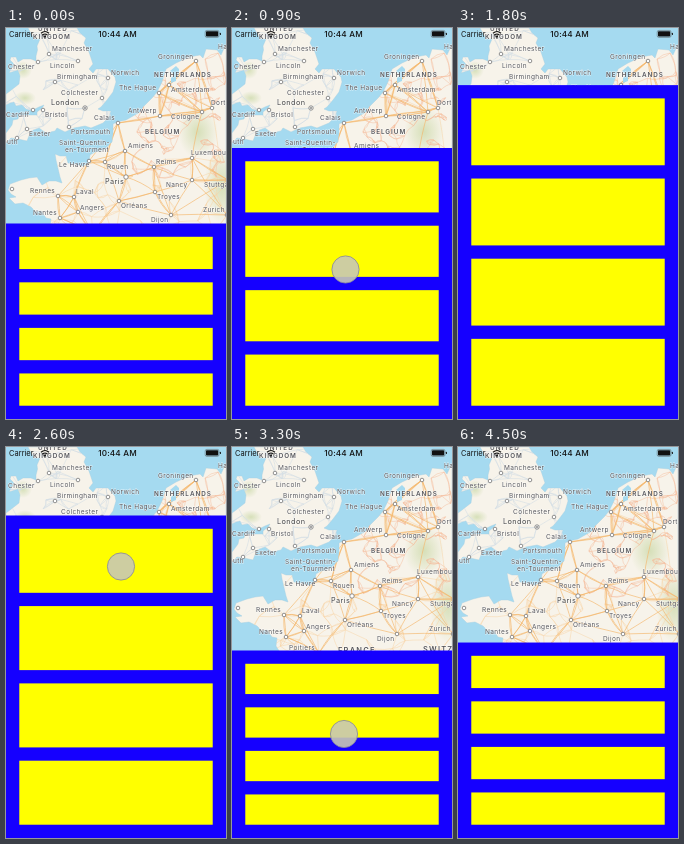
Animation of 220x391 px, one loop 4600 ms. Source, as an HTML page:

```html
<!DOCTYPE html>
<html lang="en">
<head>
<meta charset="utf-8">
<title>Map with stretching panel</title>
<style>
  html, body { margin: 0; width: 100%; height: 100%; overflow: hidden; }
  svg { display: block; width: 100%; height: 100%; }
  text { font-family: Inter, Roboto, "Liberation Sans", sans-serif; }
  #labels text {
    font-size: 6.5px; letter-spacing: .4px; fill: #55555a;
    stroke: #fff; stroke-opacity: .7; stroke-width: 1px; paint-order: stroke;
  }
  #labels .country { font-weight: 600; letter-spacing: 1px; font-size: 6.3px; }
  #labels .large { font-size: 7.5px; letter-spacing: 1.2px; }
  #labels .capital { font-size: 7.3px; fill: #444; }
  #labels circle { fill: #fff; stroke: #777; stroke-width: .8; }
</style>
</head>
<body>
<svg viewBox="0 0 220 391" preserveAspectRatio="none">
  <defs>
    <path id="land" d="M22 0L28 11 34 11 31 18 31.5 22 30 28 30 33 25 31 17 31 12 34 10 29 5 29 4 32
      8 36 3 45 12 42 13 45 14 48 13 56 4 63 0 66V77L4 75 8 74 10 78 16 77 20 81 27 83 29 81 33 79
      38 77 36 80 31 84 31 87 23 87 13 87 12 91 7 92 6 97 0 105V115L5 110 12 111 21 113 23 108
      25 103 33 100 40 105 49 103 51 100 59 104 68 100 79 98 85 100 97 95 103 89 105 83 97 83 92 81
      95 79 101 72 104 68 107 64 110 54 109 49 102 41 90 41 87 45 83 41 87 36 85 30 83 24 78 15
      80 10 74 5 71 0Z
      M220 16L215 27 211 22 200 21 197 30 194 27 183 29 170 35 160 41 156 54 151 64 147 69 138 78
      134 84 120 92 111 94 107 96 107 106 106 114 99 121 87 125 84 127 83 133 85 134 77 138 69 136
      62 135 60 128 54 128 49 126 50 132 54 149 56 155 50 153 43 153 36 157 31 149 23 150 15 152
      4 156 2 162 5 166 10 169 3 170 9 176 17 175 25 179 30 184 35 183 40 190 45 191 44 199 51 210
      61 221H220Z"/>
    <clipPath id="shore"><use href="#land"/></clipPath>
    <radialGradient id="green">
      <stop offset="0" stop-color="#cbd9a8" stop-opacity=".75"/>
      <stop offset="1" stop-color="#cbd9a8" stop-opacity="0"/>
    </radialGradient>
  </defs>
  <rect width="220" height="391" fill="#a5daf0"/>
  <use href="#land" fill="#f7f3ea" stroke="#a3cde0" stroke-width=".4"/>
  <g clip-path="url(#shore)" fill="none">
    <g fill="url(#green)">
      <ellipse cx="19" cy="70" rx="11" ry="7"/>
      <ellipse cx="17" cy="42" rx="9" ry="9"/>
      <ellipse cx="192" cy="104" rx="20" ry="26"/>
      <ellipse cx="216" cy="158" rx="18" ry="38"/>
    </g>
    <path id="lanes" stroke="#d3dde5" stroke-width=".6"/>
    <path id="minor" stroke="#f7d3a4" stroke-width=".5"/>
    <path id="dense" stroke="#f3b796" stroke-width=".45"/>
    <path id="major" stroke="#f5b76b" stroke-width=".65"/>
  </g>
  <path d="M164 43l6-5 3 3v5l-3 3v4l-5 2v-5l3-3z" fill="#a5daf0"/>
  <g id="labels"></g>

  <g fill="#111">
    <text x="3" y="8.7" font-size="7.5">Carrier</text>
    <text x="111.5" y="9" font-size="8.2" font-weight="500" text-anchor="middle" letter-spacing=".15">10:44 AM</text>
    <path d="M35 5.2Q39 1.8 43 5.2M36.6 7Q39 5 41.4 7" fill="none" stroke="#111" stroke-width="1.2"/>
    <circle cx="39" cy="8.4" r="1"/>
    <rect x="199.2" y="2.4" width="13.8" height="7" rx="1.6" fill="none" stroke="#555" stroke-width=".5"/>
    <rect x="200" y="3.2" width="12.2" height="5.4" rx=".8"/>
    <rect x="213.9" y="4.7" width="1" height="2.4" rx=".5"/>
  </g>

  <g id="panel">
    <rect width="220" height="391" fill="#1500ff"/>
  </g>
  <circle id="touch" r="13.6" fill="#c8c8b2" fill-opacity=".9" stroke="#8585a0" stroke-width=".8"/>
</svg>
<script>
const $ = id => document.getElementById(id);
function add(parent, tag, attrs, text = '') {
  const el = document.createElementNS('http://www.w3.org/2000/svg', tag);
  for (const key in attrs) el.setAttribute(key, attrs[key]);
  el.textContent = text;
  return parent.appendChild(el);
}

// name, marker x, marker y, text x, text centre y
const north = [
  ['Manchester', 43, 26, 46, 21], ['Chester', 32, 34, 2, 38.5], ['Lincoln', 72, 33, 44, 37.5],
  ['Birmingham', 49, 54, 51, 49], ['Norwich', 102, 50, 105, 45], ['Groningen', 190, 33, 152, 29],
  ['Amsterdam', 163, 57, 165, 62], ['The Hague', 153, 65, 113, 60], ['London', 79, 80, 45, 74.5],
  ['Colchester', 96, 70, 55, 65], ['Antwerp', 154, 88, 122, 83], ['Cologne', 196, 84, 165, 89],
  ['Dortmund', 206, 80, 205, 75], ['Cardiff', 27, 82, 0, 87], ['Bristol', 37, 82, 39, 87],
  ['Calais', 112, 95, 88, 90], ['Portsmouth', 63, 99, 65, 104], ['Exeter', 21, 101, 23, 106],
  ['Plymouth', 11, 110, -20, 114]
];
const south = [
  ['Amiens', 119, 123, 122, 118], ['Luxembourg', 186, 130, 185, 125], ['Le Havre', 83, 133, 53, 137],
  ['Rouen', 99, 134, 101, 139], ['Reims', 148, 139, 150, 134], ['Paris', 120, 149, 99, 154],
  ['Nancy', 186, 152, 160, 157], ['Troyes', 149, 164, 151, 169], ['Rennes', 52, 168, 24, 163],
  ['Laval', 68, 169, 70, 164], ['Angers', 72, 184, 74, 179.5], ['Orléans', 113, 173, 115, 178],
  ['Nantes', 54, 190, 27, 185], ['Dijon', 165, 187, 145, 191.5], ['Zurich', 221, 187, 197, 182],
  ['Stuttgart', 222, 152, 198, 157], ['Poitiers', 87, 206, 57, 201]
];
const plain = [
  ['Saint-Quentin-', 53, 115], ['en-Tourment', 59, 122], ['Hamburg', 212, 19],
  ['UNITED', 32, 1, 'country'], ['KINGDOM', 27, 8.5, 'country'], ['NETHERLANDS', 148, 47, 'country'],
  ['BELGIUM', 139, 104, 'country'], ['FRANCE', 106, 204, 'country large'],
  ['SWITZERLAND', 191, 203, 'country large']
];
const towns = [...north, ...south];

function label(name, x, y, type = '') {
  add($('labels'), 'text', { x, y: y + 2.3, class: type }, name);
}
const marker = (cx, cy, r = 1.8) => add($('labels'), 'circle', { cx, cy, r });
for (const [name, mx, my, x, y] of towns) {
  const capital = name === 'London' || name === 'Paris';
  marker(mx, my, capital ? 2.2 : 1.8);
  label(name, x, y, capital ? 'capital' : '');
}
plain.forEach(p => label(...p));
marker(79, 80, .8);
marker(6, 161);

// Roads join each place to its nearest neighbours
let seed = 11;
const random = () => (seed = (seed * 16807) % 2147483647) / 2147483647;
const scatter = (count, x, y, w, h) =>
  Array.from({ length: count }, () => [x + random() * w, y + random() * h]);
function roads(id, points, links) {
  let d = '';
  for (const [x, y] of points) {
    const near = points.map(p => [Math.hypot(p[0] - x, p[1] - y), ...p])
      .sort((a, b) => a[0] - b[0]).slice(1, links + 1);
    for (const [, u, v] of near) {
      const cx = (x + u) / 2 + random() * 6 - 3, cy = (y + v) / 2 + random() * 6 - 3;
      d += `M${x} ${y}Q${cx} ${cy} ${u} ${v}`;
    }
  }
  $(id).setAttribute('d', d);
}
const hubs = towns.map(c => [c[1], c[2]]);
const british = ([x, y]) => x < 106 && y < 112;
const mainland = hubs.filter(p => !british(p));
roads('lanes', [...hubs.filter(british), ...scatter(40, 0, 0, 106, 112)], 3);
roads('minor', [...mainland, ...scatter(60, 10, 125, 210, 90)], 3);
roads('dense', scatter(130, 125, 25, 95, 125), 3);
roads('major', mainland, 4);

const LOOP = 4600, STEP = 100, LOW = 195.5, HIGH = 68.5, PAD = 13.28;
const bars = Array.from({ length: 4 }, () =>
  add($('panel'), 'rect', { x: PAD, width: 220 - 2 * PAD, fill: '#ff0' }));

// Each drag: finger keys [time, x, y] and its distance below the panel top
const drags = [
  { grip: 121.5, keys: [[500, 115, 317], [650, 115, 317], [900, 113.5, 241.5], [1200, 108, 148],
    [1300, 106, 104], [1500, 105, 60], [1650, 105, 57]] },
  { grip: 51, keys: [[2600, 115, 119.5], [3300, 112, 287], [3500, 112, 322], [3700, 112, 337]] }
];

function finger(keys, t) {
  const i = Math.max(1, keys.findIndex(k => k[0] >= t));
  const [a, b] = [keys[i - 1], keys[i]], p = (t - a[0]) / (b[0] - a[0]);
  return [a[1] + (b[1] - a[1]) * p, a[2] + (b[2] - a[2]) * p];
}
const stretch = over => over * .216 / (1 + over * .216 / 93);
const rubber = y => y < HIGH ? HIGH - stretch(HIGH - y) : y > LOW ? LOW + stretch(y - LOW) : y;

function state(t) {
  let top = LOW, touch = null;
  for (const { grip, keys } of drags) {
    const [end, , lastY] = keys.at(-1);
    if (t < keys[0][0]) break;
    if (t <= end) {
      touch = finger(keys, t);
      top = rubber(touch[1] - grip);
    } else {
      const from = rubber(lastY - grip), rest = from < HIGH ? HIGH : LOW;
      const s = (t - end) * .0108;
      top = rest + (from - rest) * (1 + s) * Math.exp(-s);
      touch = null;
    }
  }
  return { top, touch };
}

function draw(now) {
  const t = Math.floor(now % LOOP / STEP) * STEP;
  const { top, touch } = state(t);
  $('panel').firstElementChild.setAttribute('y', top);
  const height = (391 - top - 5 * PAD) / 4;
  bars.forEach((bar, i) => {
    bar.setAttribute('y', top + PAD + i * (height + PAD));
    bar.setAttribute('height', height);
  });
  $('touch').style.display = touch ? '' : 'none';
  if (touch) {
    $('touch').setAttribute('cx', touch[0]);
    $('touch').setAttribute('cy', touch[1]);
  }
}

const start = performance.now();
function tick() {
  draw(performance.now() - start);
  requestAnimationFrame(tick);
}
tick();
</script>
</body>
</html>
```
